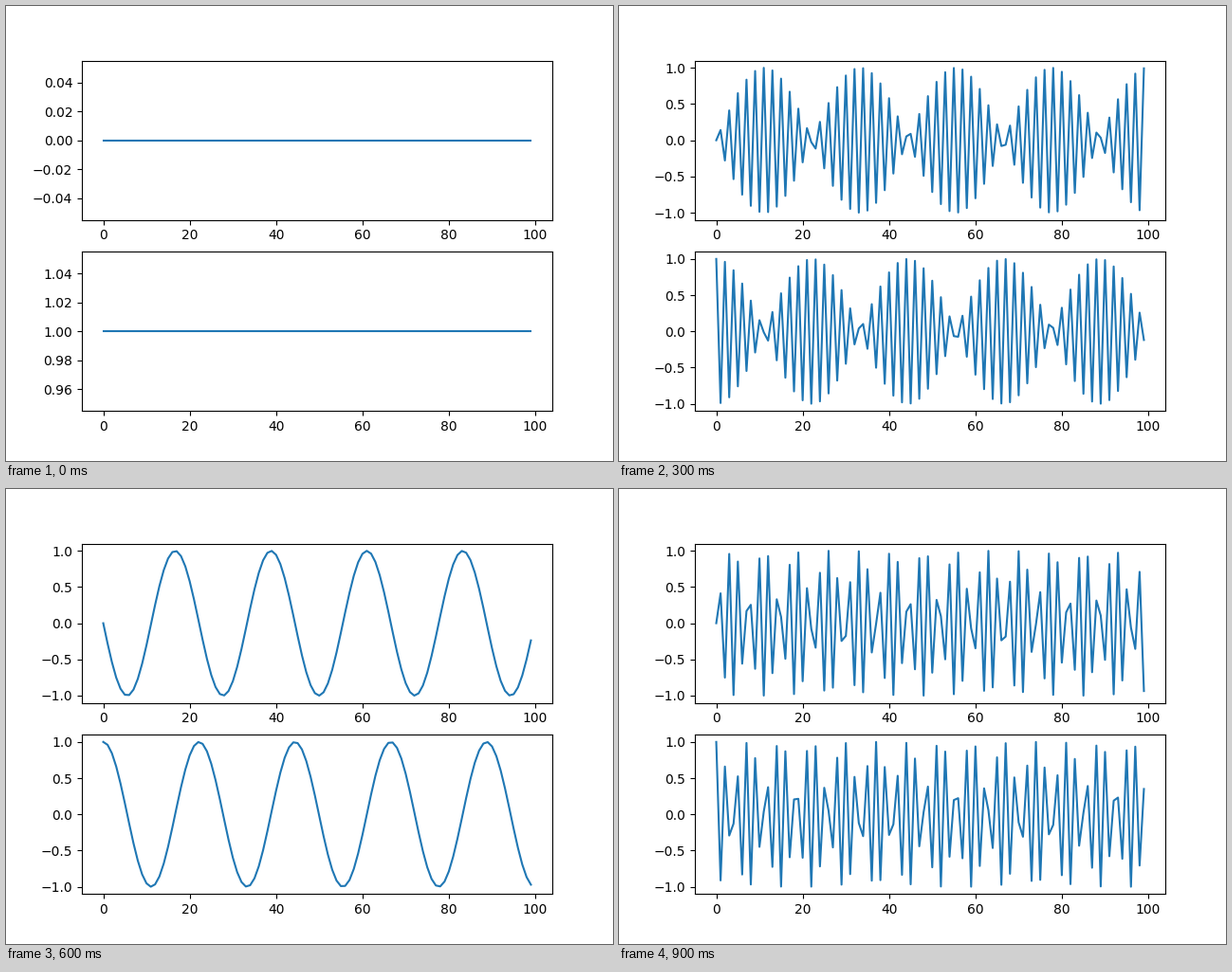
A matplotlib script that plays this animation: 640 by 480 pixels, repeating every 1000 ms.

```python
import numpy as np
import matplotlib.pyplot as plt
from matplotlib.animation import FuncAnimation

FRAMES = 10
INTERVAL = 100  # ms

x = np.arange(100)
waves = (np.sin, np.cos)

fig, axes = plt.subplots(2, 1, figsize=(6.4, 4.8), dpi=100)
lines = [ax.plot(x, wave(0 * x))[0] for ax, wave in zip(axes, waves)]


def update(frequency):
    """Redraw both sampled waves and refit their axes."""
    for ax, line, wave in zip(axes, lines, waves):
        line.set_ydata(wave(frequency * x))
        ax.relim()
        ax.autoscale_view()
    return lines


anim = FuncAnimation(fig, update, frames=FRAMES, interval=INTERVAL,
                     init_func=lambda: update(0), repeat=True,
                     repeat_delay=0, blit=False)

plt.show()
```
